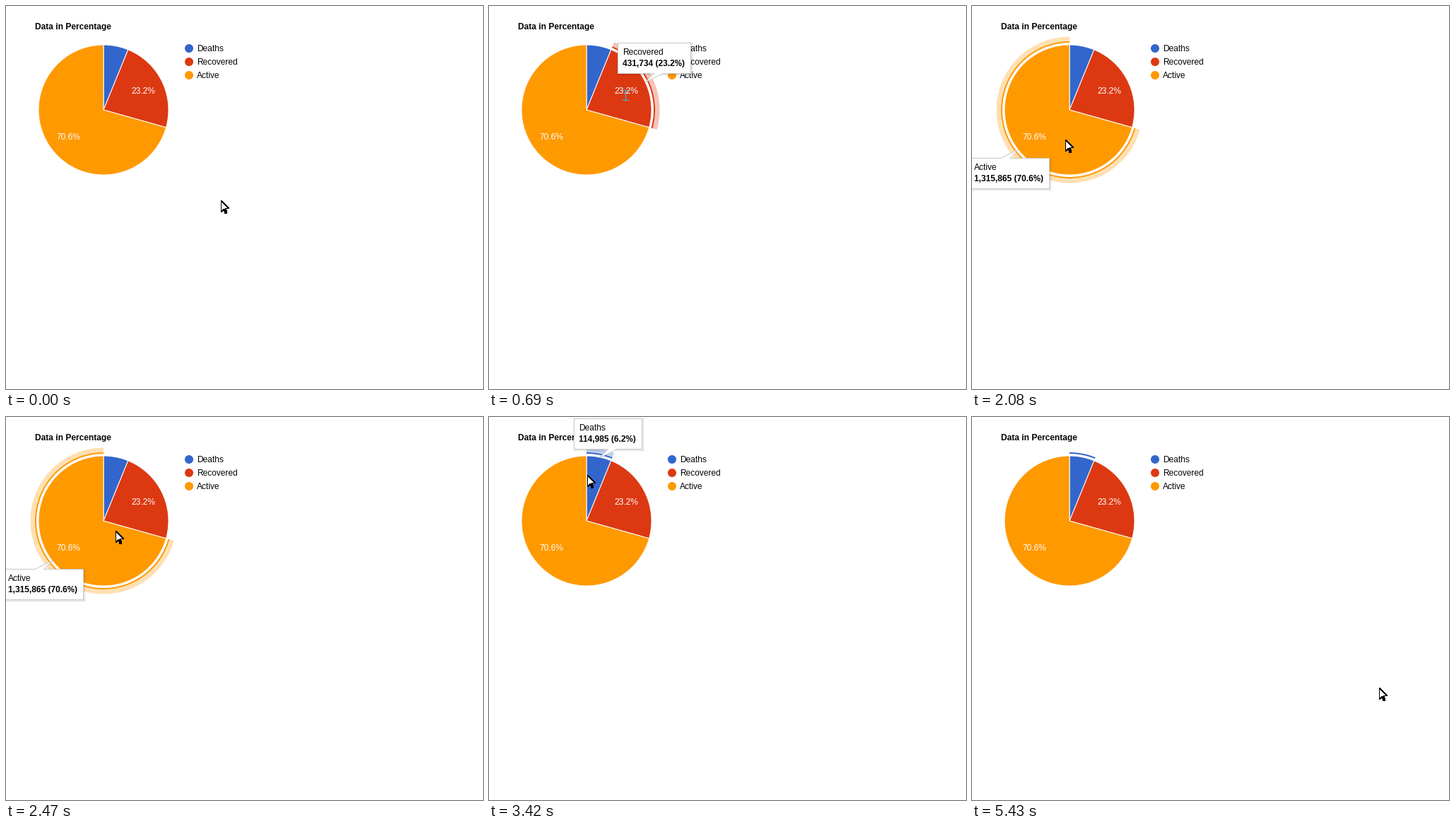
Write a matplotlib script that moves like this. It is 675 by 542 pixels and loops after 5.5 s.

```python
import math

import matplotlib.pyplot as plt
import numpy as np
from matplotlib.animation import FuncAnimation
from matplotlib.patches import Circle, Polygon

W, H, DPI = 675, 542, 64
LOOP, STEP = 5500, 20
TICK = 78  # ms between pointer positions while it moves
PX = 72 / DPI
CX, CY, R = 138, 147, 92

NAMES = ["Deaths", "Recovered", "Active"]
COUNTS = [114985, 431734, 1315865]
COLORS = ["#3366cc", "#dc3912", "#ff9900"]
SHARES = [c / sum(COUNTS) for c in COUNTS]
EDGES = np.cumsum([0] + SHARES) * 2 * math.pi

# Pointer moves: first and last change in ms, bend of the curve, end point
START = (304, 275)
MOVES = [
    (70, 540, (205, 180), (192, 125)),
    (1240, 1620, (158, 175), (120, 177)),
    (1850, 1850, None, (132, 182)),
    (2080, 2080, None, (132, 189)),
    (2400, 2860, (185, 140), (148, 93)),
    (3180, 3250, (144, 88), (139, 82)),
    (4960, 5430, (160, 114), (576, 383)),
]
CLICKS = [(690, 1), (2080, 2), (3420, 0)]

plt.rcParams["text.hinting"] = "native"
fig = plt.figure(figsize=(W / DPI, H / DPI), dpi=DPI, facecolor="white")
ax = fig.add_axes([0, 0, 1, 1])
ax.set_xlim(0, W)
ax.set_ylim(H, 0)
ax.axis("off")


def write(x, y, text, color="black", weight="normal", z=5):
    return ax.text(x, y, text, color=color, weight=weight, zorder=z,
                   family="Liberation Sans", size=12 * PX,
                   ha="left", va="baseline")


def shape(points, fill, edge="none", z=1, **kw):
    return ax.add_patch(Polygon(points, closed=True, facecolor=fill,
                                edgecolor=edge, linewidth=PX, zorder=z, **kw))


def polar(angle, r):
    return CX + r * np.sin(angle), CY - r * np.cos(angle)


def arc(i, r):
    return np.column_stack(polar(np.linspace(EDGES[i], EDGES[i + 1], 120), r))


def ring(i, inner, outer, alpha, z):
    points = np.vstack([arc(i, inner), arc(i, outer)[::-1]])
    return shape(points, COLORS[i], z=z, alpha=alpha)


def middle(i):
    return (EDGES[i] + EDGES[i + 1]) / 2


def tooltip(i):
    tip_x, tip_y = np.round(polar(middle(i), R))
    side = 1 if tip_x > CX else -1
    down = 1 if tip_y > CY else -1
    value = write(0, 0, f"{COUNTS[i]:,} ({SHARES[i]:.1%})", weight="bold", z=10)
    width = round(value.get_window_extent().width) + 15
    mid = tip_x + 12 * side
    x0 = round(mid - width / 2)
    x1 = x0 + width
    near = tip_y + 12 * down
    far = near + 43 * down
    top = min(near, far)

    parts = [value, write(x0 + 7, top + 17, NAMES[i], z=10)]
    value.set_position((x0 + 7, top + 33))
    for grow in range(3):
        a, b = 1 - grow, 2 + grow
        box = [(x0 + a, top + a), (x1 + b, top + a),
               (x1 + b, top + 43 + b), (x0 + a, top + 43 + b)]
        parts.append(shape(box, "black", z=8, alpha=0.04))
    tail = sorted([mid, mid + 13 * side])
    outline = [(x0, near), (tail[0], near), (tip_x, tip_y), (tail[1], near),
               (x1, near), (x1, far), (x0, far)]
    parts.append(shape(np.array(outline) + 0.5, "white", "#cccccc", z=9,
                       joinstyle="round"))
    return parts


write(41, 33, "Data in Percentage", weight="bold")
labels = []
for i, (name, color) in enumerate(zip(NAMES, COLORS)):
    y = 60 + 19 * i
    ax.add_patch(Circle((259, y), 6, facecolor=color, edgecolor="none", zorder=4))
    write(270, y + 4, name)
    shape(np.vstack([[(CX, CY)], arc(i, R)]), color, "white", z=3)
    if SHARES[i] > 0.1:
        x, y = polar(middle(i), 0.68 * R)
        labels.append((x, y))
        write(round(x - 17), round(y + 4), f"{SHARES[i]:.1%}", "white")

glow = [ring(i, R, R + 6.5, 0.3, 1) for i in range(3)]
far_glow = [ring(i, R + 5, R + 11.5, 0.3, 1) for i in range(3)]
mark = [ring(i, R + 3, R + 5, 1, 2) for i in range(3)]
tips = [tooltip(i) for i in range(3)]

ARROW = np.array([(0, 0), (0, 16), (4, 12), (6, 18), (8, 17), (6, 11),
                  (11, 11)]) + 0.5
BEAM = np.array([(-4, -7), (4, -7), (0, -7), (0, 7), (-4, 7), (4, 7)]) + 0.5
arrow = shape(ARROW, "white", "black", z=12, antialiased=False)
beam, = ax.plot([], [], color="#23c6ed", lw=PX, zorder=12, antialiased=False)


def pointer(t):
    pos = np.array(START, float)
    for first, last, bend, end in MOVES:
        if t < first:
            break
        steps = round((last - first) / TICK) + 1
        s = min(steps, int((t - first) / TICK + 0.2) + 1) / steps
        bend = pos if bend is None else np.array(bend)
        pos = (1 - s) ** 2 * pos + 2 * s * (1 - s) * bend + s * s * np.array(end)
    return np.round(pos)


def slice_at(x, y):
    dx, dy = x - CX, CY - y
    if math.hypot(dx, dy) > R:
        return None
    angle = math.atan2(dx, dy) % (2 * math.pi)
    return int(np.searchsorted(EDGES, angle, side="right")) - 1


def draw(n):
    t = n * STEP + STEP // 2
    pos = pointer(t)
    hover = slice_at(*pos)
    picked = None
    for when, i in CLICKS:
        if t >= when:
            picked = i
    for i in range(3):
        glow[i].set_visible(i == hover and i != picked)
        far_glow[i].set_visible(i == hover and i == picked)
        mark[i].set_visible(i == picked)
        for part in tips[i]:
            part.set_visible(i == hover)
    on_text = any(abs(pos[0] - x) < 17 and abs(pos[1] - y) < 7
                  for x, y in labels)
    arrow.set_visible(not on_text)
    beam.set_visible(on_text)
    arrow.set_xy(ARROW + pos)
    beam.set_data(*(BEAM + pos).T)
    return []


anim = FuncAnimation(fig, draw, frames=LOOP // STEP, interval=STEP,
                     init_func=lambda: draw(0), repeat=True, repeat_delay=0)
plt.show()
```
